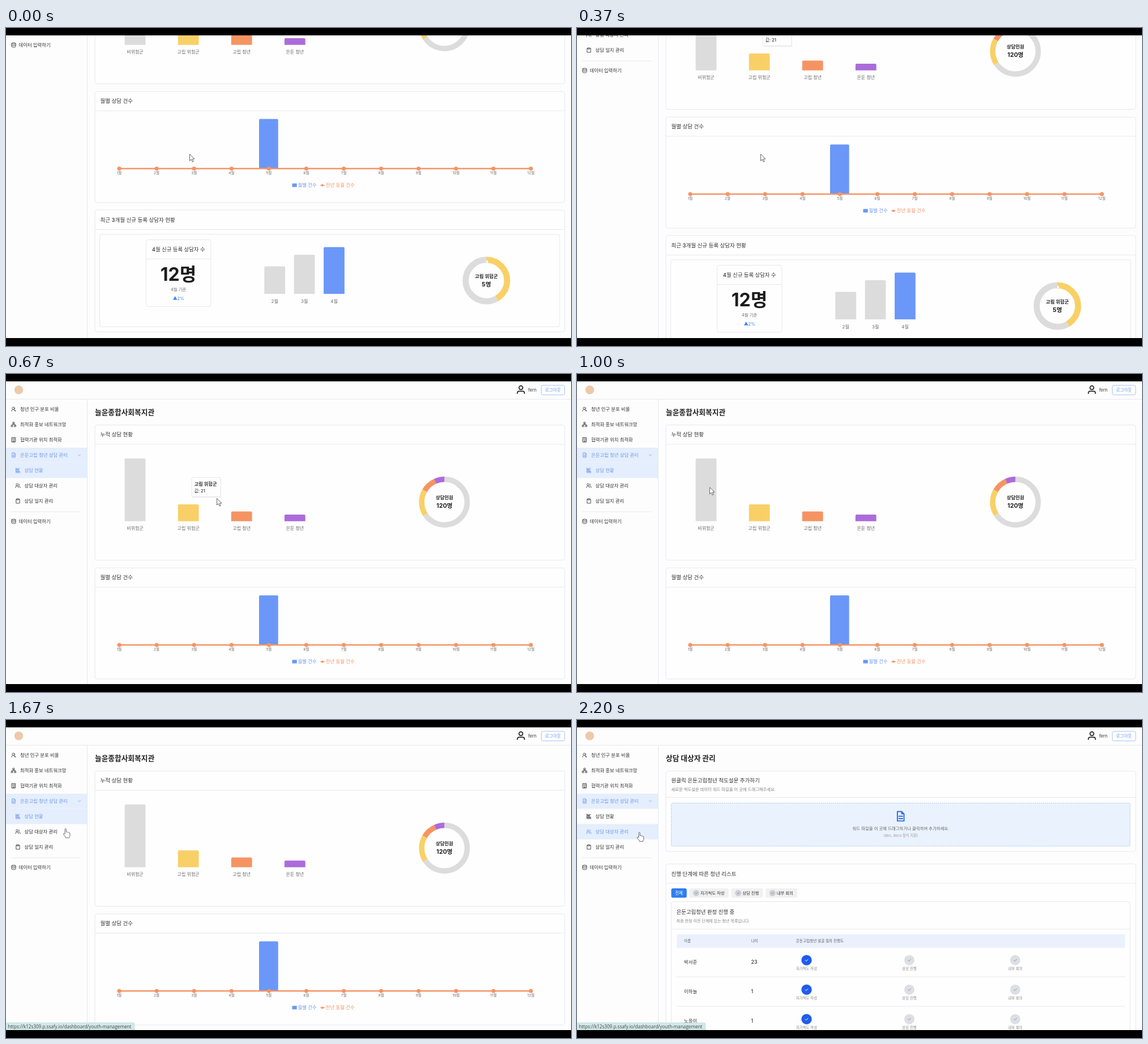
These frames come from a looping animation (998x561 px, 2.23 s). An HTML page:

```html
<!DOCTYPE html>
<html lang="ko">
<head>
<meta charset="utf-8">
<title>상담 현황</title>
<style>
html, body { margin: 0; width: 100%; height: 100%; overflow: hidden; background: #000; }
svg { display: block; width: 100vw; height: 100vh; }
text { font-family: Inter, "Noto Sans CJK KR", "Noto Sans CJK", sans-serif; white-space: pre; }
.url { font-family: "Open Sans", "Noto Sans", sans-serif; }
.scroll, .before, .after, .tip, .arrow, .hand, .link1, .link2 { animation: 2230ms step-end infinite; }
.scroll { animation-name: scroll; }
.before { animation-name: before; }
.after { animation-name: after; }
.tip { animation-name: tip; }
.arrow { animation-name: arrow; }
.hand { animation-name: hand; }
.link1 { animation-name: link1; }
.link2 { animation-name: link2; }
.cursor { animation: move 2230ms linear infinite; }
@keyframes scroll {
  0% { transform: translateY(-230px); }
  16.37% { transform: translateY(-185px); }
  17.8% { transform: translateY(-105px); }
  19.15% { transform: translateY(-29.5px); }
  20.76% { transform: translateY(-5px); }
  22.29%, 100% { transform: translateY(0); }
}
@keyframes move {
  0%, 23.3% { transform: translate(324px, 222px); animation-timing-function: ease-in-out; }
  30%, 33% { transform: translate(372px, 219px); animation-timing-function: ease-in-out; }
  56%, 66% { transform: translate(111px, 182px); animation-timing-function: ease-in-out; }
  82%, 93% { transform: translate(101px, 198px); }
  97.3%, 100% { transform: translate(110px, 198px); }
}
@keyframes before { 0% { opacity: 1; } 94%, 100% { opacity: 0; } }
@keyframes after { 0% { opacity: 0; } 94%, 100% { opacity: 1; } }
@keyframes tip { 0% { opacity: 1; } 40%, 100% { opacity: 0; } }
@keyframes arrow { 0% { opacity: 1; } 50.4%, 100% { opacity: 0; } }
@keyframes hand { 0% { opacity: 0; } 50.4%, 100% { opacity: 1; } }
@keyframes link1 { 0% { opacity: 0; } 54% { opacity: 1; } 69.5%, 100% { opacity: 0; } }
@keyframes link2 { 0% { opacity: 0; } 69.5%, 100% { opacity: 1; } }
</style>
</head>
<body>
<svg id="stage" viewBox="0 0 998 561" preserveAspectRatio="none"></svg>
<script>
const INK = '#333', GRAY = '#dcdcdc', YELLOW = '#f9d067', ORANGE = '#f59463',
  PURPLE = '#ab6cda', BLUE = '#6b97f8', LINK = '#6f98ea', LINE = '#e6e8ee', TINT = '#e4eefc';

// y is the vertical middle of the text
const text = (x, y, size, str, { fill = INK, w = 500, at = 'start', cls = '' } = {}) =>
  `<text x="${x}" y="${y + size * .37}" font-size="${size}" font-weight="${w}" fill="${fill}" text-anchor="${at}" class="${cls}">${str}</text>`;
const mid = (x, y, size, str, fill = '#6b6b6b', w = 400) => text(x, y, size, str, { fill, w, at: 'middle' });
const rect = (x, y, x2, y2, fill, r = 0, extra = '') =>
  `<rect x="${x}" y="${y}" width="${x2 - x}" height="${y2 - y}" rx="${r}" fill="${fill}" ${extra}/>`;
const hline = (x, x2, y, color = LINE) => `<path d="M${x} ${y}H${x2}" stroke="${color}"/>`;
const dot = (x, y, r, fill, extra = '') => `<circle cx="${x}" cy="${y}" r="${r}" fill="${fill}" ${extra}/>`;
const group = (cls, ...parts) => `<g class="${cls}">${parts.join('')}</g>`;
const box = (x, y, x2, y2, r = 4) => rect(x, y, x2, y2, '#fefefe', r, `stroke="${LINE}"`);
const card = (y, y2, title, rule, titleY = y + 16.5) =>
  box(157, y, 987, y2) + hline(157, 987, rule) + text(166.5, titleY, 9.5, title);
const bar = (x, x2, y, y2, fill) =>
  `<path d="M${x} ${y2}V${y + 2}q0-2 2-2H${x2 - 2}q2 0 2 2V${y2}z" fill="${fill}"/>`;

// parts are [value, colour], clockwise from the top
function donut(cx, cy, r, width, parts) {
  const sum = parts.reduce((s, p) => s + p[0], 0);
  let start = 0;
  return parts.map(([value, color]) => {
    const len = value / sum * 100;
    const arc = dot(cx, cy, r, 'none', `stroke="${color}" stroke-width="${width}" pathLength="100"
      stroke-dasharray="${len} ${100 - len}" stroke-dashoffset="${-start}" transform="rotate(-90 ${cx} ${cy})"`);
    start += len;
    return arc;
  }).join('');
}

const icons = {
  people: 'M2 21v-2a6 6 0 0 1 12 0v2M8 3a4.5 4.5 0 1 0 .1 0M16 3.5a4.5 4.5 0 0 1 0 8M17 14a6 6 0 0 1 5 6v1',
  search: 'M10 3a5 5 0 1 0 .1 0M3 21c0-5 3-8 7-8s7 3 8 8M16 4a5 5 0 0 1 0 8M17 15l4 6',
  tree: 'M9 2h6v6H9zM2 16h6v6H2zM16 16h6v6h-6zM5 16v-4h14v4M12 8v4',
  building: 'M4 2h16v20H4zM9 22v-4h6v4M8 6h2M14 6h2M8 10h2M14 10h2M8 14h2M14 14h2',
  file: 'M14 2H5v20h14V7zM14 2v5h5M8 12h8M8 17h8',
  chart: 'M3 2v20h19M3 4h17M7 8h9v3H7zM7 15h13v3H7z',
  board: 'M8 4H4v18h16V4h-4M8 2h8v5H8z',
  data: 'M3 5a9 3 0 1 0 18 0a9 3 0 1 0-18 0V19a9 3 0 0 0 18 0V5M3 12a9 3 0 0 0 18 0',
  down: 'M5 9l7 7l7-7',
  check: 'M4 12l6 6L20 7'
};
const icon = (name, x, y, size, color, width = 2.2) =>
  `<path d="${icons[name]}" transform="translate(${x - size / 2} ${y - size / 2}) scale(${size / 24})"
    fill="none" stroke="${color}" stroke-width="${width}" stroke-linecap="round" stroke-linejoin="round"/>`;

const item = (name, y, label, indent = 0, color = INK) =>
  icon(name, 13.5 + indent, y, 9.5, color) + text(25 + indent, y, 8.4, label, { fill: color });
const sub = (name, y, label, active) =>
  (active ? rect(0, y - 13.5, 143, y + 13.5, TINT) : '') + item(name, y, label, 7.5, active ? LINK : INK);
const subs = first => sub('chart', 170, '상담 현황', first) + sub('people', 197, '상담 대상자 관리', !first);

const header = hline(0, 998, 44.5) + dot(22.5, 28, 7.7, '#ecc9aa') +
  dot(909.5, 24.2, 3.3, 'none', 'stroke="#222" stroke-width="1.7"') +
  '<path d="M903.3 35v-1.6q0-3 3-3h6.4q3 0 3 3V35" fill="none" stroke="#222" stroke-width="1.7"/>' +
  text(922.5, 28.5, 7.6, 'fern', { w: 400 }) +
  rect(945.5, 20, 986.8, 36.8, '#fefefe', 2.5, 'stroke="#a9c3f2"') + mid(966, 28.5, 7.5, '로그아웃', LINK, 500);

const sidebar = `<path d="M143.5 44V790" stroke="${LINE}"/>` +
  item('search', 62, '청년 인구 분포 비율') + item('tree', 89, '최적화 홍보 네트워크망') +
  item('building', 116, '협력기관 위치 최적화') +
  rect(0, 130, 143, 156.5, TINT) + item('file', 143, '은둔고립 청년 상담 관리', 0, LINK) +
  icon('down', 129.5, 143, 7, LINK, 2.6) +
  group('before', subs(true)) + group('after', subs(false)) +
  sub('board', 224, '상담 일지 관리') + hline(9, 131, 243) +
  icon('data', 13.5, 260, 9.5, INK) + text(22.5, 260, 8.4, '데이터 입력하기');

const heading = str => text(157, 67, 12.7, str, { fill: '#222', w: 700 });

const totals = card(90, 328.5, '누적 상담 현황', 124) +
  [['비위험군', 149, GRAY], ['고립 위험군', 230, YELLOW], ['고립 청년', 242.5, ORANGE], ['은둔 청년', 248, PURPLE]]
    .map(([label, y, color], i) => {
      const x = 228 + i * 94.1;
      return bar(x - 18.4, x + 18.4, y, 259.7, color) + mid(x, 272, 8, label);
    }).join('') +
  donut(774.4, 226, 40.2, 9.5, [[79, GRAY], [21, YELLOW], [12, ORANGE], [8, PURPLE]]) +
  mid(774.5, 217.5, 8.4, '상담인원', '#222', 700) + mid(774.5, 232.5, 10.7, '120명', '#222', 700);

const months = Array.from({ length: 12 }, (_, i) => [200 + i * 66.1, i + 1]);
const monthly = card(342, 538, '월별 상담 건수', 376) +
  bar(447, 480.7, 390.5, 478, BLUE) +
  `<path d="M200 478H927" stroke="${ORANGE}" stroke-width="2.6"/>` +
  months.map(([x, n]) => dot(x, 478, 3.6, ORANGE) + mid(x, 485.2, 6.5, n + '월')).join('') +
  rect(505.5, 504.3, 513.7, 510.5, BLUE) + text(515.7, 507.3, 8.3, '월별 건수', { fill: BLUE, w: 400 }) +
  `<path d="M555 507.5h8" stroke="${ORANGE}" stroke-width="1.3"/>` + dot(559, 507.5, 2, ORANGE) +
  text(564.7, 507.3, 8.4, '전년 동월 건수', { fill: ORANGE, w: 400 });

const recent = card(551, 766, '최근 3개월 신규 등록 상담자 현황', 585.5, 568.2) +
  box(165.5, 594, 978, 757, 3) + box(247.5, 603.5, 361.8, 721.5) + hline(247.5, 361.8, 637.5) +
  mid(304.7, 621, 9.4, '4월 신규 등록 상담자 수', INK, 500) +
  mid(304.5, 664, 32, '12명', '#1c1c1c', 700) + mid(304.7, 691, 7.4, '4월 기준') +
  '<path d="M295 709.5h7.4l-3.7-6.6z" fill="#3f82ee"/>' + text(302.6, 706.8, 7.7, '2%', { fill: '#3f82ee', w: 400 }) +
  [['2월', 650.5, GRAY], ['3월', 630, GRAY], ['4월', 616.5, BLUE]].map(([label, y, color], i) => {
    const x = 474.7 + i * 52.4;
    return bar(x - 18.4, x + 18.4, y, 699, color) + mid(x, 711.7, 8, label);
  }).join('') +
  donut(848.5, 675.5, 36.6, 10.8, [[5, YELLOW], [7, GRAY]]) +
  mid(848.5, 667.5, 8.4, '고립 위험군', '#222', 700) + mid(848.5, 682.2, 10.6, '5명', '#222', 700);

const tooltip = rect(328.5, 183.5, 380, 218, '#0001', 2) + box(328, 182.5, 379, 216.5, 2) +
  text(332.7, 193.7, 8.2, '고립 위험군', { w: 600 }) + text(332.7, 205.8, 7.6, '값: 21');

const badge = (x, y, r, fill, color = '#8d939d') => dot(x, y, r, fill) + icon('check', x, y, r * .85, color, 3);
const tab = (x, x2, label) => rect(x, 297, x2, 313.5, '#f1f1f2', 3) +
  badge(x + 12.3, 305.3, 5.6, '#cdd0d6', '#555') + text(x + 19.7, 305.3, 7.4, label);
const upload = card(90, 232, '원클릭 은둔고립청년 척도설문 추가하기', 136.5, 106) +
  text(166.5, 122, 7.3, '새로운 척도설문 데이터 워드 파일을 이 곳에 드래그해주세요.', { fill: '#858585', w: 400 }) +
  rect(166.5, 146.5, 977, 222.5, '#eaf2fd', 2, 'stroke="#a8c5f2" stroke-dasharray="2 1.5"') +
  icon('file', 571.8, 169.8, 20, '#2f6fdc', 2.3) +
  mid(572, 191, 7.4, '워드 파일을 이 곳에 드래그하거나 클릭하여 추가하세요.', '#666') +
  mid(572, 203.3, 6.3, '(doc, docs 형식 지원)', '#999');

const steps = [[405.5, '자가척도 작성'], [587, '상담 진행'], [774, '내부 회의']];
const row = ([name, age], i) => {
  const y = 426.7 + i * 52;
  return text(189, y, 8.4, name) + text(307.5, y, 8.8, age) + hline(176, 968, y + 26.3) +
    steps.map(([x, label], k) =>
      (k ? '' : dot(x, y - 3, 10, '#cfe0fb')) +
      badge(x, y - 3, 9, k ? '#dcdfe4' : '#1f5bea', k ? '#8d939d' : '#fff') +
      mid(x, y + 12.4, 6.4, label, '#888')).join('');
};
const small = (x, str) => text(x, 389.7, 6.6, str, { fill: '#5c6068' });
const list = card(254, 800, '진행 단계에 따른 청년 리스트', 288, 271) +
  rect(166.5, 297, 193.8, 313.5, '#2f7eee', 3) + mid(180.1, 305.3, 7.5, '전체', '#fff', 500) +
  tab(198.2, 268, '자가척도 작성') + tab(272.5, 328.5, '상담 진행') + tab(333, 389, '내부 회의') +
  box(166.5, 320.5, 977, 800) + text(175.7, 338.7, 9.4, '은둔고립청년 판정 진행 중') +
  text(175.7, 354.5, 7, '최종 판정 이전 단계에 있는 청년 목록입니다.', { fill: '#858585', w: 400 }) +
  hline(166.5, 977, 369) + rect(176, 378, 968, 402, '#eaf1fc', 2) +
  small(189, '이름') + small(307.5, '나이') + small(387, '은둔고립청년 발굴 절차 진행도') +
  [['박서준', '23'], ['이하늘', '1'], ['노을이', '1']].map(row).join('');

const status = (cls, width, page) => group(cls,
  rect(-3, 534, width, 550, '#d2e8e9', 2, 'stroke="#c3d9db" stroke-width=".6"') +
  text(3.2, 541.3, 8.14, 'https://k12s309.p.ssafy.io/dashboard/' + page, { fill: '#444', w: 400, cls: 'url' }));

const outline = 'fill="#fff" stroke="#555" stroke-width=".9" stroke-linejoin="round"';
const cursor = group('cursor',
  group('arrow', `<path d="M.5 .5V12.3L3.3 9.8L5.3 14.2L7.2 13.3L5.2 9H9z" ${outline}/>`),
  group('hand', `<path d="M-.9 9.5V1.3q0-1.2 1.1-1.2t1.1 1.2V6q2-.8 2.4.6q1.8-.7 2.2.7q2-.4 2 1.5v3q0 1.8-1.3 3.2v1.2H.2v-1.2L-3.6 10.2q-.6-1.6.9-1.7z" ${outline}/>`));

document.getElementById('stage').innerHTML =
  '<clipPath id="view"><path d="M0 13H998V547H0z"/></clipPath><g clip-path="url(#view)">' +
  rect(0, 13, 998, 547, '#fdfdfd') +
  group('scroll', header, sidebar,
    group('before', heading('늘윤종합사회복지관'), totals, monthly, recent, group('tip', tooltip)),
    group('after', heading('상담 대상자 관리'), upload, list)) +
  status('link1', 223, 'youth-consultation') + status('link2', 227, 'youth-management') +
  cursor + '</g>';
</script>
</body>
</html>
```
